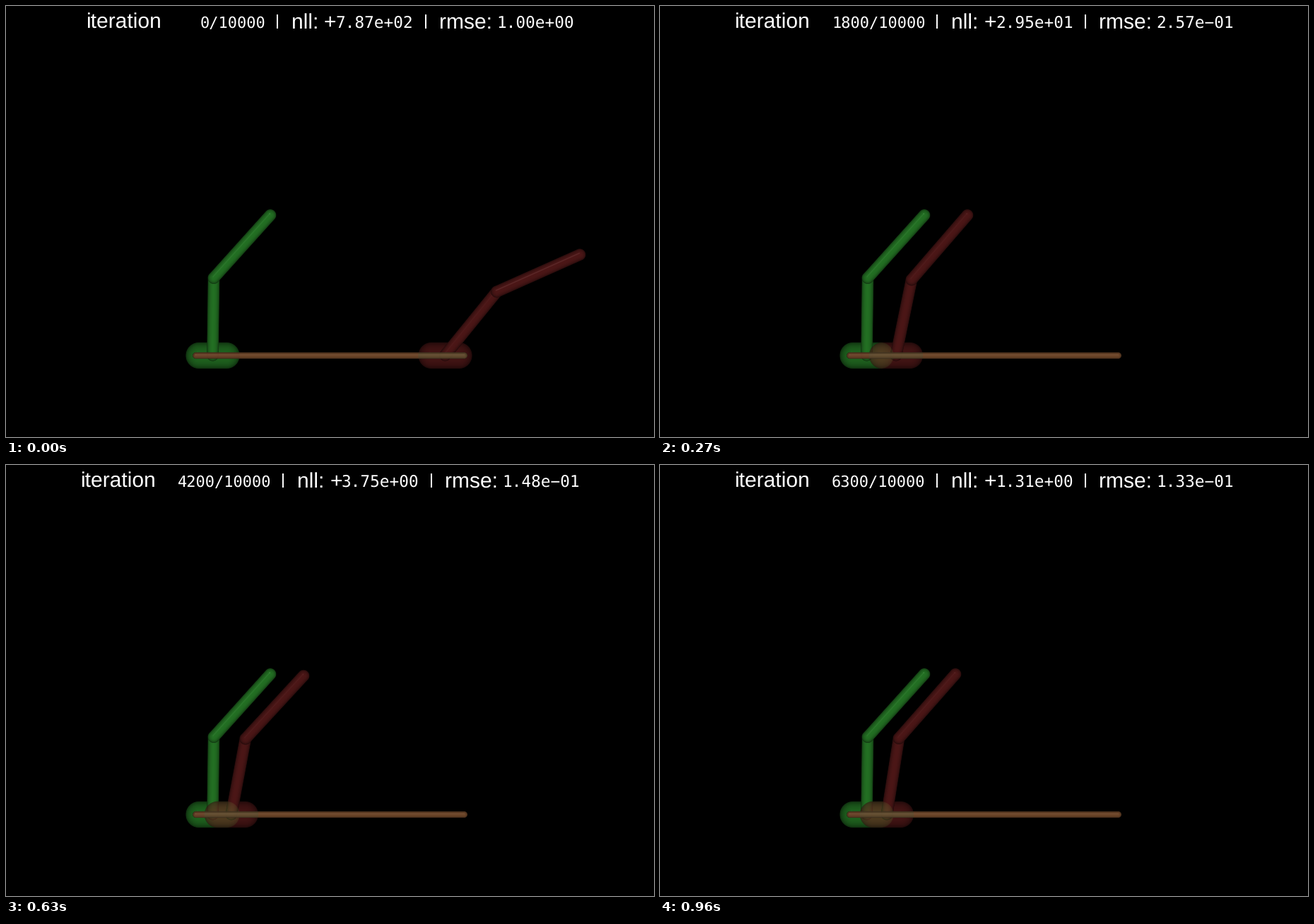
These frames come from a looping animation (917x611 px, 1990 ms). A matplotlib script:

```python
import numpy as np
import matplotlib.pyplot as plt
from matplotlib.animation import FuncAnimation
from matplotlib.patches import Rectangle

W, H, DPI = 917, 611, 100
TOP, BOTTOM = 270, 530          # rows that hold the scene
STEP, TICK, LOOP = 30, 10, 1990
LAST = 32
RAIL_Y = 495.5

GREEN = np.array([35, 111, 35]) / 255
RED = np.array([126, 38, 38]) / 255
TAN = np.array([118, 76, 45]) / 255
OLIVE = np.array([96, 81, 51]) / 255
RUST = np.array([112, 64, 42]) / 255
RED_ALPHA = 0.6
GLINT = -0.10 - 0.23j           # where the surface mirrors the light

# step, cart x, elbow x, elbow y, tip x, tip y, nll, rmse
KEYS = np.array([
    [0, 621.5, 694.5, 405, 812, 352.5, 787, 1.00],
    [5, 328.5, 346, 387.5, 416, 289.5, 54.8, 0.330],
    [9, 334, 356, 388, 435, 296.5, 29.5, 0.257],
    [18, 315, 339.5, 389, 424, 302.5, 7.33, 0.162],
    [23, 321.5, 338.5, 387.5, 419, 296.5, 2.40, 0.140],
    [27, 338.5, 345, 386, 419, 290, 4.06, 0.136],
    [32, 321, 338, 387.5, 418, 296.5, 1.31, 0.133],
])

yy, xx = np.mgrid[TOP:BOTTOM, 0:W] + 0.5
Z = xx + 1j * yy


def capsule(p, q, r):
    """Coverage, facing ratio and highlight of a round-ended bar."""
    d = q - p
    t = np.clip(((Z - p) * np.conj(d)).real / abs(d) ** 2, 0, 1)
    normal = (Z - p - t * d) / r
    dist = np.abs(normal)
    cover = np.clip(r - r * dist + 0.5, 0, 1)
    facing = np.sqrt(np.clip(1 - dist ** 2, 0, 1))
    mirror = ((normal * np.conj(GLINT)).real
              + facing * np.sqrt(1 - abs(GLINT) ** 2))
    return cover, facing, np.clip(mirror, 0, 1) ** 200


def lit(color, facing, shine, gain=1.0, gloss=0.15):
    shade = gain * (0.32 + 0.68 * facing)
    return shade[..., None] * color + gloss * shine[..., None]


def robot(base, elbow, tip, color):
    rgb, alpha = np.zeros(Z.shape + (3,)), np.zeros(Z.shape)
    cart = base.real + 1j * RAIL_Y
    parts = [(cart - 19.5, cart + 19.5, 18.7, 0.9, 0.02),
             (base, elbow, 8.4, 1, 0.12), (elbow, tip, 8.4, 1, 0.12)]
    covers = []
    for p, q, r, gain, gloss in parts:
        cover, facing, shine = capsule(p, q, r)
        c = cover[..., None]
        rgb = rgb * (1 - c) + c * lit(color, facing, shine, gain, gloss)
        alpha = np.maximum(alpha, cover)
        covers.append(cover)
    return rgb, alpha, covers[0]


still, _, still_cart = robot(292.5 + 495j, 294 + 385.5j, 374 + 296.5j, GREEN)
rail_cover, rail_facing, rail_shine = capsule(
    268.7 + RAIL_Y * 1j, 648.5 + RAIL_Y * 1j, 4.6)

steps = KEYS[:, 0]
arm1 = np.log(KEYS[:, 2] - KEYS[:, 1] + 1j * (KEYS[:, 3] - 495))
arm2 = np.log(KEYS[:, 4] - KEYS[:, 2] + 1j * (KEYS[:, 5] - KEYS[:, 3]))


def ease(k):
    """The first stretch slows down as it settles."""
    if k >= steps[1]:
        return k
    return steps[1] * (1 - (1 - k / steps[1]) ** 1.5)


def pose(k):
    s = ease(k)
    base = np.interp(s, steps, KEYS[:, 1]) + 495j
    elbow = base + np.exp(np.interp(s, steps, arm1))
    tip = elbow + np.exp(np.interp(s, steps, arm2))
    return base, elbow, tip


def render(k):
    rgb, alpha, cart = robot(*pose(k), RED)
    img = still * (1 - RED_ALPHA * alpha[..., None]) + RED_ALPHA * rgb
    g, r = still_cart[..., None], 0.8 * cart[..., None]
    tint = TAN * (1 - g) + RUST * g
    tint = tint * (1 - r) + OLIVE * r
    c = 0.92 * rail_cover[..., None]
    img = img * (1 - c) + c * lit(tint, rail_facing, rail_shine)
    return np.clip(img, 0, 1)


plt.rcParams["text.hinting"] = "none"
fig = plt.figure(figsize=(W / DPI, H / DPI), dpi=DPI, facecolor="black")
ax = fig.add_axes([0, 0, 1, 1])
ax.set_xlim(0, W)
ax.set_ylim(H, 0)
ax.axis("off")
scene = ax.imshow(np.zeros(Z.shape + (3,)), extent=(0, W, BOTTOM, TOP),
                  interpolation="nearest", aspect="auto")


def label(text, px, y, family):
    return ax.text(0, y, text, color="white", family=family,
                   size=px * 72 / DPI, va="baseline", ha="left")


def sans(text):
    return label(text, 30, 32, "Liberation Sans")


def mono(px):
    return label("", px, 31, "DejaVu Sans Mono")


COUNT_PX = 22
title, count = sans("iteration"), mono(COUNT_PX)
nll, rmse = mono(22.7), mono(22.7)
moving = [(sans("nll:"), 403.7), (sans("+"), 450), (nll, 466.8),
          (sans("rmse:"), 613), (rmse, 694.6)]
bars = [(ax.add_patch(Rectangle((0, 12), 2.4, 20, color="white", lw=0)), x)
        for x in (382.8, 592.6)]


def sci(k, col):
    value = np.exp(np.interp(k, steps, np.log(KEYS[:, col])))
    return f"{value:.2e}".replace("-", "\u2212")


def caption(k):
    n = min(200 * k, 6300)
    shift = 2.7 * (len(str(n)) - 1)
    text = f"{n}/10000"
    title.set_x(113.7 - shift)
    count.set_text(text)
    count.set_x(367.3 + shift - 0.602 * COUNT_PX * len(text))
    nll.set_text(sci(k, 6))
    rmse.set_text(sci(k, 7))
    for item, x in moving + bars:
        item.set_x(x + shift)


shown = None


def update(i):
    global shown
    k = min(i * TICK // STEP, LAST)
    if k != shown:
        scene.set_data(render(k))
        caption(k)
        shown = k
    return [scene]


anim = FuncAnimation(fig, update, frames=LOOP // TICK, interval=TICK,
                     repeat=True, repeat_delay=0, blit=False)
plt.show()
```
